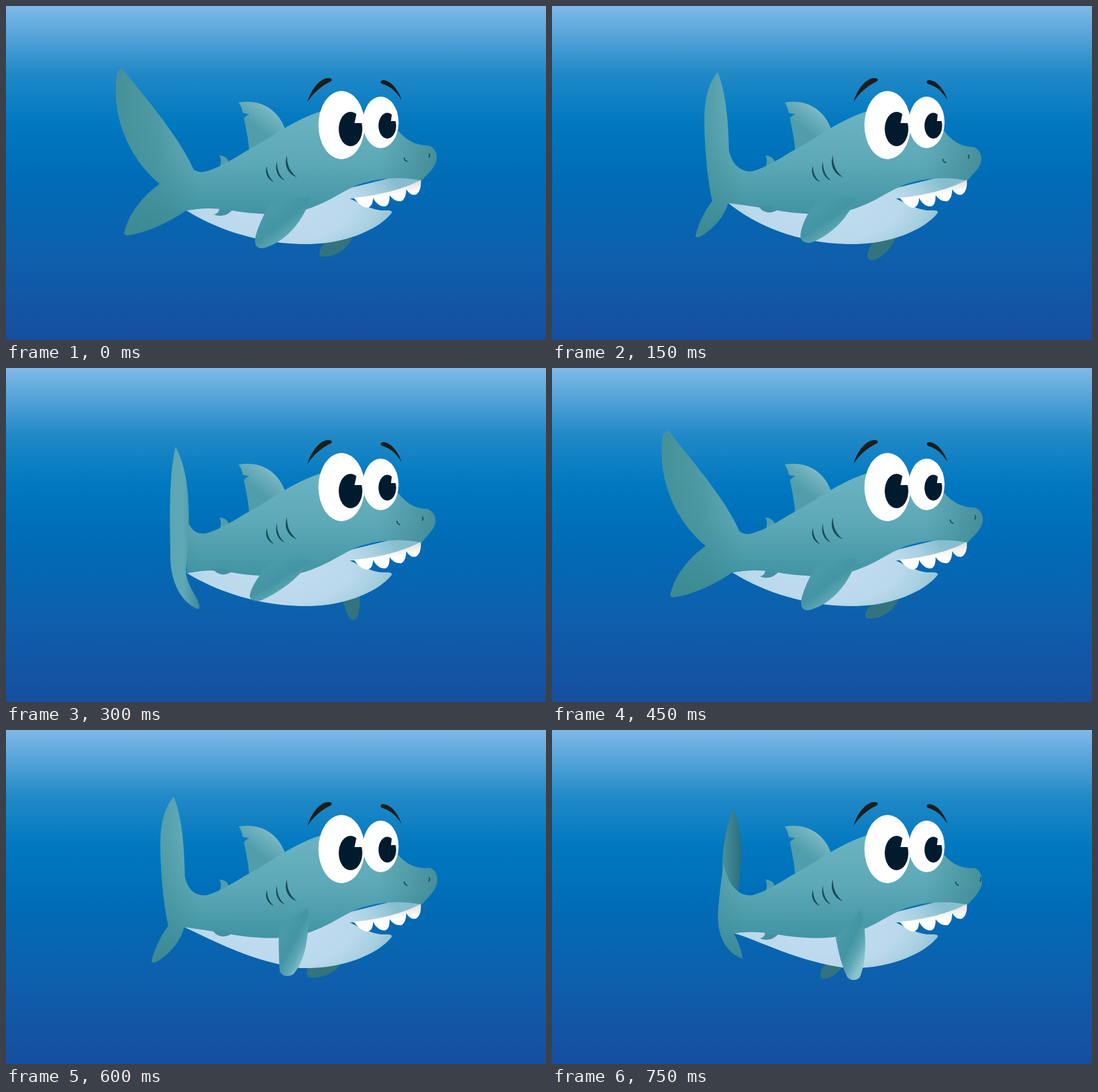
These frames come from a looping animation (815x505 px, 0.9 s). An HTML page:

```html
<!DOCTYPE html>
<html lang="en">
<head>
<meta charset="utf-8">
<title>Swimming shark</title>
<style>
  html, body { margin: 0; width: 100%; height: 100%; overflow: hidden; background: #0069b6; }
  svg { display: block; width: 815px; height: 505px; }
</style>
</head>
<body>
<svg viewBox="0 0 815 505">
  <defs>
    <linearGradient id="sea" x2="0" y2="1">
      <stop stop-color="#7fbae8"/>
      <stop offset=".1" stop-color="#50a1d7"/>
      <stop offset=".2" stop-color="#2189c7"/>
      <stop offset=".35" stop-color="#0078c0"/>
      <stop offset=".52" stop-color="#006cb7"/>
      <stop offset=".75" stop-color="#0e5fac"/>
      <stop offset="1" stop-color="#174e9f"/>
    </linearGradient>
    <linearGradient id="skin" gradientUnits="userSpaceOnUse" x1="0" y1="160" x2="0" y2="345">
      <stop stop-color="#6bb3c2"/>
      <stop offset=".4" stop-color="#5da9b7"/>
      <stop offset=".82" stop-color="#4294a4"/>
      <stop offset="1" stop-color="#3a8797"/>
    </linearGradient>
    <linearGradient id="shade" gradientUnits="userSpaceOnUse" x1="165" y1="0" x2="650" y2="0">
      <stop stop-color="#3d8b92" stop-opacity=".85"/>
      <stop offset=".13" stop-color="#3d8b92" stop-opacity=".6"/>
      <stop offset=".26" stop-color="#3d8b92" stop-opacity="0"/>
      <stop offset=".82" stop-color="#3d8590" stop-opacity="0"/>
      <stop offset="1" stop-color="#3d8590" stop-opacity=".75"/>
    </linearGradient>
    <radialGradient id="belly" gradientUnits="userSpaceOnUse" cx="410" cy="300" r="190"
                    gradientTransform="translate(0 150) scale(1 .5)">
      <stop stop-color="#c3dcf1"/>
      <stop offset=".6" stop-color="#bbd9ec"/>
      <stop offset=".8" stop-color="#a7d0e0"/>
      <stop offset="1" stop-color="#87becf"/>
    </radialGradient>
    <linearGradient id="dorsal" x1=".75" y1=".05" x2=".4" y2=".55">
      <stop stop-color="#a5d0d7"/>
      <stop offset=".3" stop-color="#74b5c0"/>
      <stop offset="1" stop-color="#509dac"/>
    </linearGradient>
    <linearGradient id="fin" x1=".85" y1=".8" x2=".35" y2=".2">
      <stop stop-color="#8cc4cc"/>
      <stop offset=".3" stop-color="#5ca6b3"/>
      <stop offset=".6" stop-color="#4395a4"/>
      <stop offset="1" stop-color="#4a9aa9"/>
    </linearGradient>
    <linearGradient id="lobe">
      <stop stop-color="#5ba6b1"/>
      <stop offset=".45" stop-color="#5fa9b7"/>
      <stop offset="1" stop-color="#3d8a98"/>
    </linearGradient>
    <linearGradient id="farLobe">
      <stop stop-color="#4a919b"/>
      <stop offset="1" stop-color="#2b6f7d"/>
    </linearGradient>
    <linearGradient id="teeth" x2=".25" y2="1">
      <stop stop-color="#cfc9c7"/>
      <stop offset=".65" stop-color="#fff"/>
    </linearGradient>
  </defs>

  <rect width="815" height="505" fill="url(#sea)"/>
  <path id="backFin" fill="#31747f"/>
  <path id="backLobe" fill="url(#farLobe)"/>
  <path id="underside" fill="url(#belly)"/>
  <path d="M323 242Q326 233 322 226Q333 226 337 237Z" fill="#539dab"/>
  <path d="M367 219C366 202 362 185 359 169L367 163Q360 163 357 161Q356 152 351 146C382 140 411 155 422 188Z" fill="url(#dorsal)"/>
  <path id="body" fill="url(#skin)"/>
  <path id="bodyShade" fill="url(#shade)"/>
  <path id="smallFin" fill="#4390a0"/>
  <path id="frontLobe" fill="url(#lobe)"/>
  <path id="sideFin" fill="url(#fin)"/>
  <path d="M525 290C532 300 540 305 546 305C552 303 554 297 554 290C558 298 565 304 572 303C577 302 579 296 579 286C584 293 590 296 597 295C602 292 604 285 604 277C608 283 612 287 619 285C625 281 627 272 626 263C600 277 560 287 525 290Z" fill="url(#teeth)"/>

  <g fill="#164a57">
    <path d="M394 242C390 251 394 262 404 266C397 259 394 252 394 242Z"/>
    <path d="M409 235C405 247 410 260 421 264C412 256 409 247 409 235Z"/>
    <path d="M424 226C419 240 425 254 439 259C428 250 424 240 424 226Z"/>
  </g>
  <path id="nostrils" fill="none" stroke="#164a57" stroke-width="1.6"/>

  <g fill="#fff">
    <ellipse cx="506.500" cy="180" rx="35" ry="51.500"/>
    <ellipse cx="565.500" cy="176" rx="27" ry="39"/>
  </g>
  <g fill="#001b2e">
    <ellipse cx="520" cy="186" rx="17.800" ry="26"/>
    <ellipse cx="575.500" cy="181" rx="13.300" ry="19.500"/>
  </g>
  <path d="M530 158L526 177H538V158ZM583 158L581 174H590V158Z" fill="#fff"/>
  <g fill="#1d1d1b">
    <path d="M455 145C461 125 475 108 487 109C492 109 493 112 490 114C479 120 468 126 455 145Z"/>
    <path d="M597 142C592 126 580 112 569 112C565 113 564 116 568 118C579 121 587 127 597 142Z"/>
  </g>
</svg>

<script>
  const STEP = 150;
  const ORDER = [0, 1, 2, 0, 3, 4];

  const back = "C325 244 345 229 367 217C400 199 435 172 473 160L591 188";
  const lip = "C598 257 562 260 535 269C508 279 488 297 452 308C415 318 375 315 340 309";
  const jaw = "445 360C515 362 565 335 582 313C584 308 575 309 566 309" +
    "C550 307 535 299 519 291C560 290 600 280 627 264L600 255L480 285L340 300Z";
  const snoutHigh = "C605 204 618 210 634 211C641 210 650 217 650 229C649 243 640 250 627 264";
  const snoutLow = "C605 206 618 212 633 213C641 213 649 222 648 233C646 245 638 250 627 264";
  const smallDown = "M322 306Q321 314 314 315C324 320 335 316 341 309Z";
  const smallUp = "M312 303Q320 304 325 302L341 308C330 315 318 313 312 303Z";
  const roundBelly = "C308 332 370 358";
  const flatBelly = "C310 317 372 351";

  // root: where the belly meets the tail; tail: outline from the root round to the back.
  const poses = [
    {
      root: "272 309", belly: roundBelly,
      tail: "C245 328 215 341 188 346C180 348 177 345 179 341C186 313 206 288 232 269" +
        "C185 230 160 168 167 107C168 98 172 93 177 97C215 145 260 196 283 247C288 251 295 252 302 250",
      snout: snoutHigh, nose: [601, 229, 638, 223], smallFin: smallDown,
      sideFin: "M402 291C395 305 378 335 376 353C375 366 383 368 392 365C425 355 450 322 460 289Z",
      backFin: "M482 358C474 365 471 374 474 378C490 383 515 370 523 350Z"
    },
    {
      root: "266 298", belly: roundBelly,
      tail: "C260 318 245 335 228 346C220 351 216 351 217 346C221 330 230 310 242 295" +
        "C235 265 231 220 230 180C229 145 235 118 250 100C262 130 266 170 267 218C271 238 283 251 302 250",
      snout: snoutLow, nose: [590, 231, 628, 225], smallFin: smallUp,
      sideFin: "M405 290C385 310 375 335 375 349C377 359 388 360 398 355C425 342 445 322 460 289Z",
      backFin: "M484 356C478 368 474 377 478 383C490 390 512 368 519 350Z"
    },
    {
      root: "273 310", belly: roundBelly,
      tail: "V228C279 246 288 252 302 250",
      snout: snoutLow, nose: [590, 231, 628, 225], smallFin: smallUp,
      sideFin: "M405 288C385 308 370 330 368 344C368 353 380 354 388 350C415 338 445 315 460 290Z",
      backFin: "M508 352C513 365 515 376 521 380C530 384 534 375 534 346Z",
      frontLobe: "M256 119C270 148 276 175 276 230C276 265 272 295 272 312C275 332 292 350 292 361" +
        "Q292 365 288 364C262 352 247 320 248 280C247 225 246 160 256 119Z"
    },
    {
      root: "269 298", belly: flatBelly,
      tail: "C263 320 248 337 231 348C223 353 219 353 220 348C224 332 233 312 245 296" +
        "C238 266 234 221 233 181C232 146 238 119 253 101C265 131 269 171 270 222C274 240 284 251 302 250",
      snout: "C605 204 618 209 635 209C643 207 651 214 651 227C649 243 640 250 627 264",
      nose: [601, 229, 638, 223], smallFin: smallUp,
      sideFin: "M456 268C440 282 420 288 412 297C411 320 412 345 413 364C416 373 427 374 434 369C450 350 458 320 456 268Z",
      backFin: "M456 358C453 368 454 373 458 374C480 376 500 365 505 353Z"
    },
    {
      root: "274 307", belly: flatBelly,
      tail: "C280 318 286 332 288 346C258 335 248 305 251 270C253 245 256 222 259 203C265 228 277 252 302 250",
      snout: "C605 204 618 209 635 209C642 208 649 216 649 229C648 243 640 250 627 264",
      nose: [609, 229, 646, 223], smallFin: smallDown,
      sideFin: "M464 270C462 281 440 300 428 313C432 335 438 360 446 374C451 380 461 379 465 373C476 345 474 305 468 280Z",
      backFin: "M412 354C404 366 403 373 408 376C418 377 432 368 440 356Z",
      backLobe: "M274 118C262 147 257 180 257 210L280 248C286 210 290 155 274 118Z"
    }
  ];

  const draw = (id, path = "") => document.getElementById(id).setAttribute("d", path);

  function show(pose) {
    const [x1, y1, x2, y2] = pose.nose;
    const body = `M${pose.root}${pose.tail}${back}${pose.snout}${lip}Q305 303 ${pose.root}Z`;
    draw("body", body);
    draw("bodyShade", body);
    draw("underside", `M${pose.root}${pose.belly} ${jaw}`);
    draw("nostrils", `M${x1} ${y1}q0 5 5 6M${x2} ${y2}q3 2 0 6`);
    for (const id of ["backFin", "sideFin", "smallFin", "backLobe", "frontLobe"]) draw(id, pose[id]);
  }

  function tick() {
    const step = Math.floor(performance.now() / STEP) % ORDER.length;
    show(poses[ORDER[step]]);
    requestAnimationFrame(tick);
  }
  tick();
</script>
</body>
</html>
```
